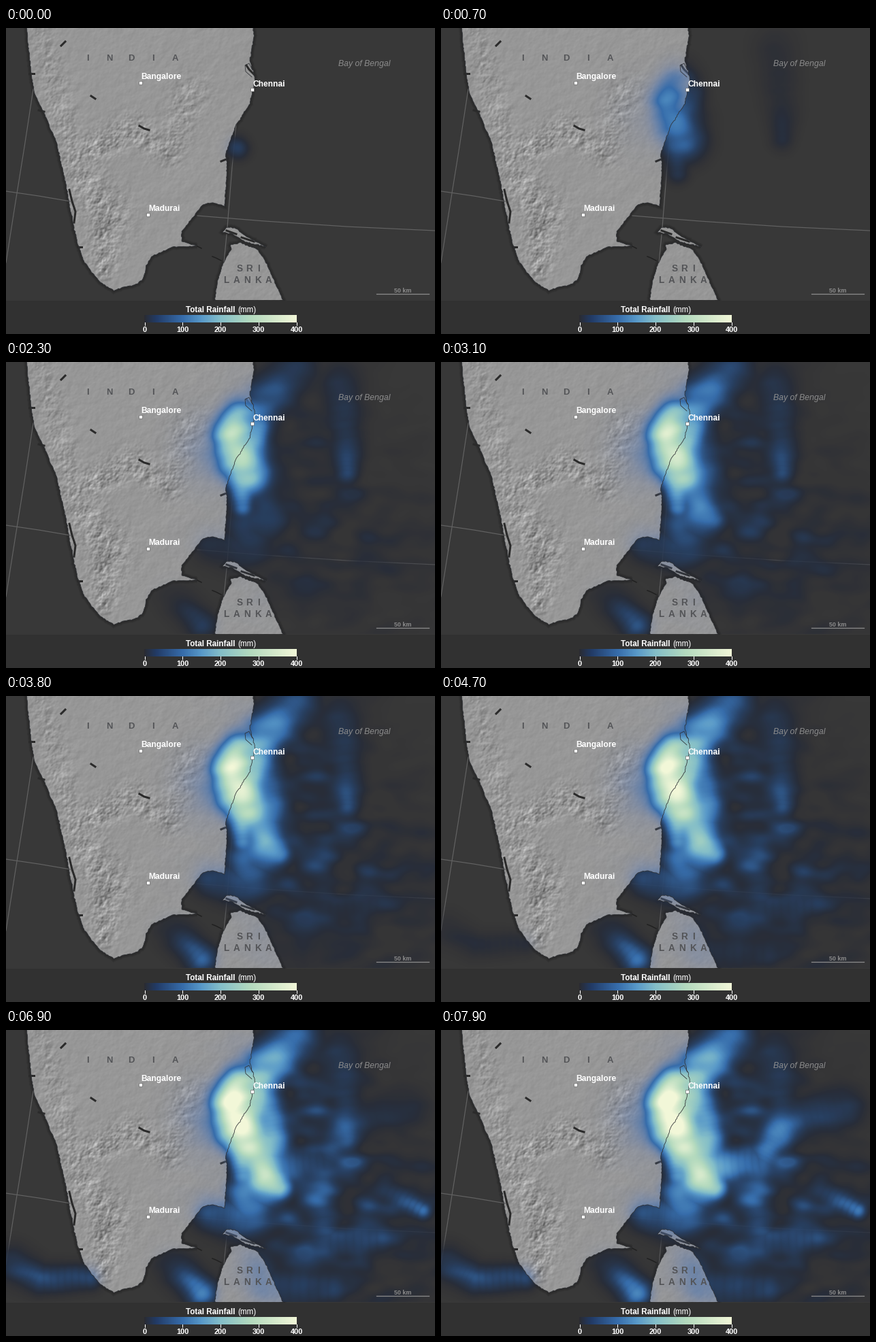
Animation, 630 px wide and 450 px high, one loop 8000 ms. Source, as a matplotlib script:

```python
import matplotlib.pyplot as plt
import numpy as np
from matplotlib.animation import FuncAnimation
from matplotlib.patches import PathPatch, Rectangle
from matplotlib.path import Path

W, H, MAP_H = 630, 450, 400
STEP, FRAMES = 100, 80
rng = np.random.default_rng(7)
yy, xx = np.mgrid[0:MAP_H, 0:W].astype(np.float32) + 0.5


def points(text):
    return np.array([p.split(",") for p in text.split()], float)


def outline(text, rough=0.4):
    """Closed coast through key points with a slightly ragged edge."""
    p = points(text)
    p = np.vstack([p, p[:1]])
    d = np.r_[0, np.cumsum(np.hypot(*np.diff(p, axis=0).T))]
    s = np.arange(0, d[-1], 2.5)
    c = np.c_[np.interp(s, d, p[:, 0]), np.interp(s, d, p[:, 1])]
    c += rng.normal(0, rough, c.shape)
    return Path(np.vstack([c, c[:1]]), closed=True)


def noise(spectrum, stretch=1):
    """Unit-variance random surface, optionally drawn out sideways."""
    fy, fx = np.fft.fftfreq(MAP_H)[:, None], np.fft.fftfreq(W)[None] * stretch
    f = np.hypot(fx, fy)
    f[0, 0] = 1
    n = rng.normal(size=(MAP_H, W))
    n = np.fft.ifft2(np.fft.fft2(n - n.mean()) * spectrum(f)).real
    return (n / n.std()).astype(np.float32)


def band(text):
    """Soft ridge along a path of x,y,radius,height points."""
    p = points(text)
    k = np.linspace(0, len(p) - 1, 7 * (len(p) - 1) + 1)
    out = np.zeros_like(xx)
    for x, y, r, h in zip(*(np.interp(k, range(len(p)), c) for c in p.T)):
        d2 = (xx - x) ** 2 + (yy - y) ** 2
        out = np.maximum(out, h * np.exp(-d2 / (2 * r * r)))
    return out


# ---- land
coasts = [
    outline("30,-5 37,68 42,97 56,125 74,168 88,230 95,270 105,316 113,340 "
            "125,358 140,375 158,386 173,381 192,377 202,368 206,350 214,336 "
            "245,322 281,321 258,314 258,300 281,270 289,260 303,257 321,262 "
            "325,200 322,186 338,142 358,112 362,92 366,74 358,48 364,12 362,-5"),
    outline("306,405 310,375 319,345 331,325 329,319 345,316 368,325 379,339 "
            "409,405"),
    outline("318,300 325,293 337,294 353,307 382,322 352,315 333,303")]
land_path = Path.make_compound_path(*coasts)
grid = np.c_[xx.ravel(), yy.ravel()]
land = np.any([c.contains_points(grid) for c in coasts], axis=0)
land = land.reshape(MAP_H, W)

hills = 0.12 + np.maximum(
    band("50,10,14,.4 75,100,15,.5 90,165,14,.6 115,225,20,.8 150,275,22,.9 "
         "143,350,13,.9"),
    band("125,178,15,.9 185,150,16,.8 240,183,14,.7 270,95,18,.5"))
gy, gx = np.gradient(noise(lambda f: f ** -1.0 / (f + 0.04) ** 0.6
                           * np.exp(-(f / 0.3) ** 2)))
slope = np.clip((gx + gy) / (gx + gy).std(), -3, 3)
terrain = np.clip(151 + 19 * slope * hills, 60, 225).astype(np.uint8)

# ---- rain: final depth in mm, onset and time constant in ms
cloud = noise(lambda f: np.exp(-(f * 32) ** 2), stretch=1.7)
drizzle = band("430,90,70,45 470,250,95,55 560,300,70,35")
RAIN = [(band(path), onset, tau) for path, onset, tau in (
    ("340,176,11,50", -9000, 1000),
    ("346,78,18,300 334,108,21,415 344,140,23,415 358,165,19,390", 0, 2300),
    ("372,95,12,150 360,130,16,200 344,170,14,200 347,212,11,150", 300, 1300),
    ("312,130,36,70", 200, 1500),
    ("362,85,22,240 377,58,21,235 397,40,21,190 428,12,22,110", 1300, 1900),
    ("382,110,17,170 390,160,18,210 372,185,22,310 380,216,19,350 402,232,12,270",
     1900, 2900),
    ("390,235,18,110 352,240,20,140 360,272,24,95 300,268,18,75", 1400, 2000),
    ("490,30,22,34 502,118,17,50 501,163,12,62", 300, 900),
    ("458,214,20,65 470,310,17,75 550,308,14,65", 2800, 2000),
    ("365,345,22,50 380,378,22,65 480,380,15,65", 3300, 2200),
    ("245,345,18,30 288,387,15,115", 1400, 2000),
    ("10,345,18,45 50,366,14,75 122,364,12,62", 4400, 900),
    ("560,238,15,50 612,266,9,115", 4500, 1300),
    ("400,200,18,190 470,194,14,120 490,154,17,125 528,130,20,80 590,115,22,50",
     6400, 800))]
RAIN.append((drizzle * np.clip(0.8 + 0.3 * cloud, 0.3, 1.6), 1200, 2600))
grain = np.clip(1 + 0.09 * cloud, 0.75, 1.25)


def rain_depth(t):
    """Smooth maximum of all bands as they build up."""
    total = sum((mm * (1 - np.exp(-max(t - onset, 0) / tau))) ** 3
                for mm, onset, tau in RAIN)
    return np.clip(np.cbrt(total) * grain, 0, 400).astype(int)


def ramp(*low):
    """RGBA per mm; low holds the (mm, r, g, b, a) stops for light rain."""
    s = np.array(low + ((100, 54, 108, 170, 1), (150, 88, 152, 200, 1),
                        (200, 132, 190, 200, 1), (280, 180, 218, 190, 1),
                        (400, 242, 247, 216, 1)), float).T
    rgba = np.array([np.interp(np.arange(401), s[0], c) for c in s[1:]]).T
    return (rgba * [1, 1, 1, 255]).astype(np.uint8)


SEA = ramp((0, 38, 38, 46, 0), (20, 36, 43, 58, .8), (55, 39, 65, 102, .92))
LAND = ramp((0, 110, 130, 180, 0), (20, 105, 128, 178, .2), (55, 85, 122, 178, .6))
KEY = ramp((0, 42, 43, 50, 1), (30, 34, 58, 100, 1))


def rain_image(t):
    mm = rain_depth(t)
    return np.where(land[..., None], LAND[mm], SEA[mm])


# ---- stage
fig = plt.figure(figsize=(W / 100, H / 100), dpi=100, facecolor="#383838")
ax = fig.add_axes([0, 0, 1, 1])
ax.axis("off")


def px(n):
    return n * 0.72


def label(x, y, s, size=12, color="white", weight="bold", ha="left", **kw):
    ax.text(x, y, s, fontsize=px(size), color=color, weight=weight, ha=ha,
            va="baseline", family="Liberation Sans", zorder=9, **kw)


def spaced(x0, x1, y, word, size):
    for x, c in zip(np.linspace(x0, x1, len(word)), word):
        label(x, y, c, size, "#535457", ha="center")


def picture(img, box, z):
    return ax.imshow(img, extent=box, aspect="auto", zorder=z,
                     interpolation="nearest")


def stroke(text, color, width, z):
    ax.plot(*points(text).T, color=color, lw=px(width), zorder=z)


full = (0, W, MAP_H, 0)
for width in (9, 7, 5, 3):
    ax.add_patch(PathPatch(land_path, fc="none", ec="black", alpha=0.06,
                           lw=px(width), zorder=1))
ground = picture(np.dstack([terrain] * 3), full, 2)
ground.set_clip_path(land_path, ax.transData)
for water in ("93,238 97,255 102,270 100,286", "196,144 203,148 210,150",
              "81,26 87,20", "125,100 131,104", "34,67 41,67", "48,121 56,123",
              "105,322 111,322", "316,196 326,192", "324,298 338,303",
              "346,308 364,314", "353,55 357,61 365,69"):
    stroke(water, "#2a2a2a", 3, 3)
for line in ("40,90 27,175 13,262 0,345", "0,240 48,247 95,255",
             "281,276 380,284 500,292 630,298", "338,142 332,205 325,293",
             "324,304 320,345"):
    stroke(line, "#626262", 1.2, 3)
rain = picture(rain_image(0), full, 4)
ax.add_patch(PathPatch(land_path, fc="none", ec="#303236", lw=px(0.8), zorder=5))
stroke("361,72 352,64 351,55 357,52 362,62", "#303236", 0.8, 5)
for islet in ("303,336 308,338 316,342", "281,321 287,324"):
    stroke(islet, "#202020", 1.5, 5)

# ---- map labels
spaced(120, 248, 47.5, "INDIA", 13)
spaced(343, 371, 358, "SRI", 13.5)
spaced(323, 386, 375, "LANKA", 13.5)
label(488, 56, "Bay of Bengal", 12.3, "#8c8c8c", "normal", style="italic")
for name, x, y in (("Bangalore", 197, 80.5), ("Chennai", 361.5, 90.5),
                   ("Madurai", 208.5, 274)):
    ax.add_patch(Rectangle((x - 2.5, y - 2.5), 5, 5, fc="white", ec="#444444",
                           lw=px(0.5), zorder=8))
    label(x + 1.2, y - 5, name)
label(583, 389, "50 km", 9, "#8a8a8a", ha="center")
stroke("544,391 621,391", "#8a8a8a", 1.3, 8)

# ---- legend
ax.add_patch(Rectangle((0, 401), W, 50, fc="#313131", ec="none", zorder=7))
label(263.5, 418, "Total Rainfall", 11.6)
label(340, 418, "(mm)", 11.6, weight="normal")
picture(KEY[None], (203, 427, 433, 422), 8)
for k in range(5):
    x = 203.5 + 55.9 * k
    stroke(f"{x},433 {x},437", "white", 1, 8)
    label(x, 447, str(100 * k), 11, ha="center")

ax.set_xlim(0, W)
ax.set_ylim(H, 0)


def update(i):
    rain.set_data(rain_image(i * STEP))
    return [rain]


anim = FuncAnimation(fig, update, frames=FRAMES, interval=STEP, repeat=True,
                     repeat_delay=0, blit=False)
plt.show()
```
